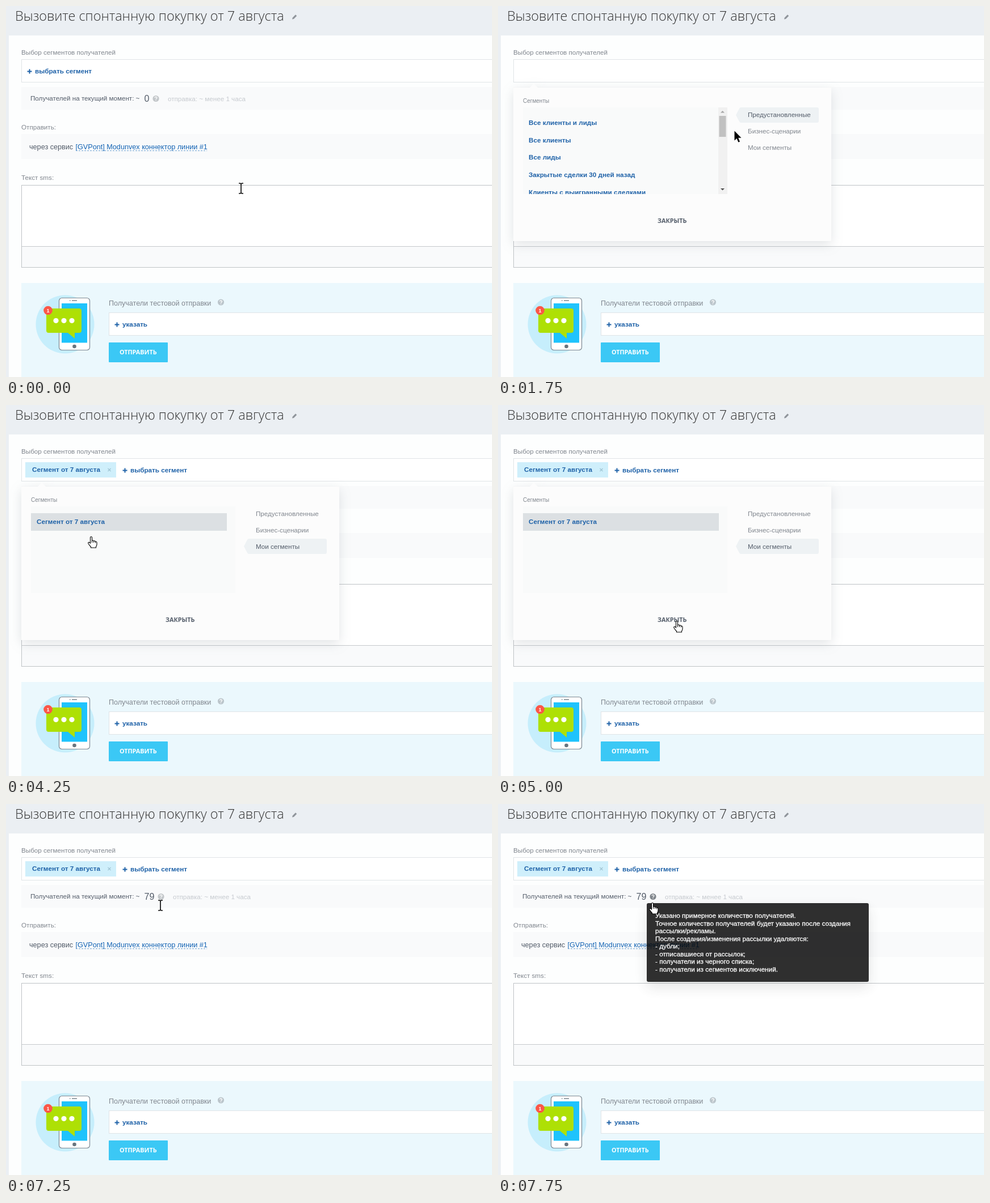
Animation of 856x655 px, one loop 8000 ms. Source, as an HTML page:

```html
<!DOCTYPE html>
<html lang="ru">
<head>
<meta charset="utf-8">
<style>
  html, body { margin: 0; width: 100%; height: 100%; overflow: hidden; background: #ebeff3; }
  svg { display: block; }
  text { font: 11.65px "Liberation Sans", Arial, sans-serif; fill: #80868e; white-space: pre; }
  .title { font: 300 23.45px "Open Sans", sans-serif; fill: #333; }
  .dark { fill: #535c69; }
  .mid { font-size: 12.65px; }
  .count { font-size: 16px; }
  .small { font-size: 10px; }
  .faint { fill: #c6cacf; }
  .link { fill: #1565b5; }
  .bold { font-weight: 700; font-size: 11.7px; fill: #1f62a8; }
  .caps { font: 700 10.8px "Open Sans", sans-serif; }
  .tip text { font-size: 11.75px; fill: #fff; stroke: #fff; stroke-width: .3px; }
  .field { fill: #fff; stroke: #e0e4e7; }
  .row { fill: #f9fafb; }
  .popup-box { filter: drop-shadow(0 6px 10px rgba(83, 92, 105, .17)); }
  .tip-box { filter: drop-shadow(0 10px 12px rgba(0, 0, 0, .13)); }
</style>
</head>
<body>
<svg width="856" height="655" viewBox="0 0 856 655">
  <defs>
    <path id="plus" d="M0 0H8M4 -4V4" stroke="#1f62a8" stroke-width="2"/>
    <g id="help">
      <circle r="5.6"/>
      <path d="M-1.9 -1.4Q-1.7 -3.2 0 -3.2T1.9 -1.5Q1.9 -.5 .8 .1Q0 .5 0 1.3M0 2.2V3.5" fill="none" stroke="#fff" stroke-width="1.3"/>
    </g>
    <path id="tabMark" d="M419 13.5L425 2Q426 0 428 0H562Q565 0 565 3V24Q565 27 562 27H428Q426 27 425 25Z" fill="#eef2f4"/>
  </defs>

  <rect width="856" height="655" fill="#ebeff3"/>
  <rect x="5" y="52" width="851" height="603" fill="#fdfefe"/>
  <text class="title" x="16" y="26">Вызовите спонтанную покупку от 7 августа</text>
  <path d="M504 23.5L504.8 20.5L510 15.2L512.2 17.4L507 22.7Z" fill="#8f959b"/>

  <text x="27" y="86">Выбор сегментов получателей</text>
  <rect class="field" x="27.500" y="94.500" width="840" height="40"/>
  <g id="chip">
    <rect x="34" y="101" width="160" height="27" fill="#cfeffb"/>
    <text class="bold" x="46" y="118">Сегмент от 7 августа</text>
    <path d="M179.500 112L184.500 117M184.500 112L179.500 117" stroke="#a0c4d3" stroke-width="1.2"/>
  </g>
  <g id="add">
    <use href="#plus" x="37.500" y="115.500"/>
    <text class="bold" x="51" y="119">выбрать сегмент</text>
  </g>

  <rect class="row" x="27" y="143" width="829" height="40"/>
  <text class="dark" x="43" y="167">Получателей на текущий момент: ~</text>
  <text class="dark count" id="count" x="243.500" y="169"></text>
  <g id="aside">
    <use href="#help" id="countHelp" x="264" y="163.500"/>
    <text class="faint" x="285" y="167.500">отправка: ~ менее 1 часа</text>
  </g>

  <text x="27" y="218">Отправить:</text>
  <rect class="row" x="27" y="226" width="829" height="44"/>
  <text class="dark mid" x="41" y="252.500">через сервис</text>
  <text class="link mid" x="122.500" y="252.500">[GVPont] Modunvex коннектор линии #1</text>
  <path d="M123 255.500H354" stroke="#6fa3d3" stroke-dasharray="3 2"/>

  <text x="27" y="307">Текст sms:</text>
  <rect x="27.500" y="316.500" width="840" height="145" fill="#fff" stroke="#bfc3c6"/>
  <rect class="row" x="28" y="425" width="828" height="36"/>
  <path d="M28 424.500H856" stroke="#c6c9cc"/>

  <rect x="27" y="489" width="829" height="166" fill="#ebf8fd"/>
  <circle cx="104" cy="562" r="51.500" fill="#c6eefc"/>
  <rect x="93.500" y="515.500" width="54" height="92" rx="5" fill="#fff" stroke="#7d8891" stroke-width="1.2"/>
  <rect x="98" y="525" width="45" height="69.500" fill="#1fc3fc"/>
  <path d="M116 520H125M112 520H113.500" stroke="#7b858d" stroke-width="1.6"/>
  <circle cx="120.500" cy="601" r="3.300" fill="#69747e"/>
  <path d="M75 534H129Q133 534 133 538V573Q133 577 129 577H121V587L109 577H75Q71 577 71 573V538Q71 534 75 534Z" fill="#aee005"/>
  <g fill="#fff"><circle cx="88" cy="555.500" r="4.600"/><circle cx="102" cy="555.500" r="4.600"/><circle cx="116" cy="555.500" r="4.600"/></g>
  <circle cx="74" cy="537.500" r="7.800" fill="#fb5748"/>
  <text x="74" y="541" text-anchor="middle" style="font-size:9px;font-weight:700;fill:#fff">1</text>
  <text style="font-size:12.55px" x="181" y="528.500">Получатели тестовой отправки</text>
  <use href="#help" x="378.500" y="523" fill="#bcc6cc"/>
  <rect class="field" x="181.500" y="541.500" width="690" height="40"/>
  <use href="#plus" x="191.500" y="562.500"/>
  <text class="bold" x="205" y="566">указать</text>
  <rect x="181" y="594" width="104" height="35" rx="1" fill="#3bc8f5"/>
  <text class="caps" x="200" y="615" style="fill:#fff">ОТПРАВИТЬ</text>

  <g id="popup">
    <path class="popup-box" d="M27 144H56L63 137L70 144H587V415H27Z" fill="#fcfcfc"/>
    <text class="small" x="44" y="170.500">Сегменты</text>
    <rect x="44" y="179" width="360" height="153" fill="#f9fafa"/>
    <g id="preset">
      <use href="#tabMark" y="179"/>
      <svg x="44" y="179" width="344" height="153" id="presetList"></svg>
      <rect x="388" y="179" width="16" height="153" fill="#f1f1f1"/>
      <rect x="389.500" y="194" width="12" height="37" fill="#c1c1c1"/>
      <path d="M392 188.500H399L395.500 185Z" fill="#a3a3a3"/>
      <path d="M392 322H399L395.500 325.500Z" fill="#505050"/>
    </g>
    <g id="mine">
      <use href="#tabMark" y="236"/>
      <rect id="itemBack" x="44" y="191" width="345" height="31"/>
      <text class="bold link" x="54" y="210">Сегмент от 7 августа</text>
    </g>
    <text id="presetTab" x="440" y="195.500">Предустановленные</text>
    <text x="440" y="224.500">Бизнес-сценарии</text>
    <text id="mineTab" x="440" y="253.500">Мои сегменты</text>
    <text class="caps dark" x="281" y="383">ЗАКРЫТЬ</text>
  </g>

  <g id="tip" class="tip">
    <rect class="tip-box" x="262" y="175" width="391" height="139" rx="3" fill="#000" opacity=".81"/>
  </g>

  <g id="arrow"><path d="M.5 .5V17.500L4.500 13.800L7.300 20.600L10 19.500L7.200 12.800H12.500Z" stroke="#fff" stroke-width="1" paint-order="stroke"/></g>
  <g id="beam" fill="none">
    <path d="M-4 -9H-1.500L0 -8L1.500 -9H4M0 -8V8M-4 9H-1.500L0 8L1.500 9H4" stroke="#111" stroke-width="1.7"/>
  </g>
  <g id="hand">
    <path d="M-1.500 12V2Q-1.500 .5 0 .5T1.500 2V7.500Q3.800 6.300 4.500 8.200Q6.800 7.200 7.400 9.200Q9.800 8.600 10 11V14.500Q9.800 16.500 8.500 18V20H-.5V18.500Q-3 16 -5 12.500Q-5.800 10.500 -4.200 10.200Q-2.800 10.300 -1.500 12Z" fill="#fff" stroke="#000" stroke-width="1.1"/>
    <path d="M1.500 7.500V11M4.500 8.300V11M7.400 9.300V11.500" stroke="#000"/>
  </g>
</svg>
<script>
const LOOP = 8000;
const $ = id => document.getElementById(id);

const addLines = (parent, lines, x, y, gap, cls) => lines.forEach((line, i) => {
  const el = document.createElementNS('http://www.w3.org/2000/svg', 'text');
  el.setAttribute('x', x);
  el.setAttribute('y', y + i * gap);
  el.setAttribute('class', cls);
  el.textContent = line;
  parent.append(el);
});

addLines($('presetList'), ['Все клиенты и лиды', 'Все клиенты', 'Все лиды',
  'Закрытые сделки 30 дней назад', 'Клиенты с выигранными сделками'], 10, 31, 30.7, 'bold link');
addLines($('tip'), ['Указано примерное количество получателей.',
  'Точное количество получателей будет указано после создания', 'рассылки/рекламы.',
  'После создания/изменения рассылки удаляются:', '- дубли;', '- отписавшиеся от рассылок;',
  '- получатели из черного списка;', '- получатели из сегментов исключений.'], 277, 201, 13.57, '');

// Time, pointer shape, hot spot
const pointer = [
  [0, 'beam', 414, 322],
  [250, 'arrow', 290, 232],
  [500, 'hand', 112, 116],
  [1000, 'hand', 112, 118],
  [1250, 'arrow', 190, 150],
  [1750, 'arrow', 416, 220],
  [2000, 'hand', 474, 246],
  [2500, 'arrow', 415, 238],
  [2750, 'arrow', 350, 226],
  [3000, 'hand', 190, 220],
  [3250, 'hand', 135, 217],
  [4250, 'hand', 150, 232],
  [4500, 'arrow', 215, 295],
  [4750, 'hand', 300, 372],
  [5000, 'hand', 315, 381],
  [5250, 'arrow', 310, 375],
  [5500, 'arrow', 298, 353],
  [6000, 'arrow', 225, 224],
  [6250, 'arrow', 226, 212],
  [6500, 'arrow', 246, 194],
  [6750, 'beam', 264, 181],
  [7000, 'beam', 272, 179],
  [7500, 'hand', 272, 174]
];

const show = (id, on) => $(id).style.display = on ? '' : 'none';
const shift = (id, x, y = 0) => $(id).setAttribute('transform', `translate(${x} ${y})`);

function draw(t) {
  const within = (from, to = LOOP) => t >= from && t < to;
  const picked = within(3750), mine = within(2250);
  show('popup', within(750, 5250));
  show('preset', !mine);
  show('mine', mine);
  $('presetTab').classList.toggle('dark', !mine);
  $('mineTab').classList.toggle('dark', mine);
  $('itemBack').setAttribute('fill', within(4250) ? '#dce0e3' : within(3000) ? '#eff0f2' : 'none');

  show('chip', picked);
  show('add', !within(750, 2250));
  shift('add', picked ? 168 : 0);
  $('count').textContent = picked ? '79' : '0';
  shift('aside', picked ? 9 : 0);
  $('countHelp').setAttribute('fill', within(7500) ? '#80868c' : '#c3c7ca');
  show('tip', within(7500));
  $('tip').style.opacity = within(7750) ? 1 : .6;

  const [, shape, x, y] = pointer.findLast(step => step[0] <= t);
  ['arrow', 'beam', 'hand'].forEach(id => show(id, id === shape));
  shift(shape, x, y);
}

const start = performance.now();
function tick() {
  draw((performance.now() - start) % LOOP);
  requestAnimationFrame(tick);
}
tick();
</script>
</body>
</html>
```
